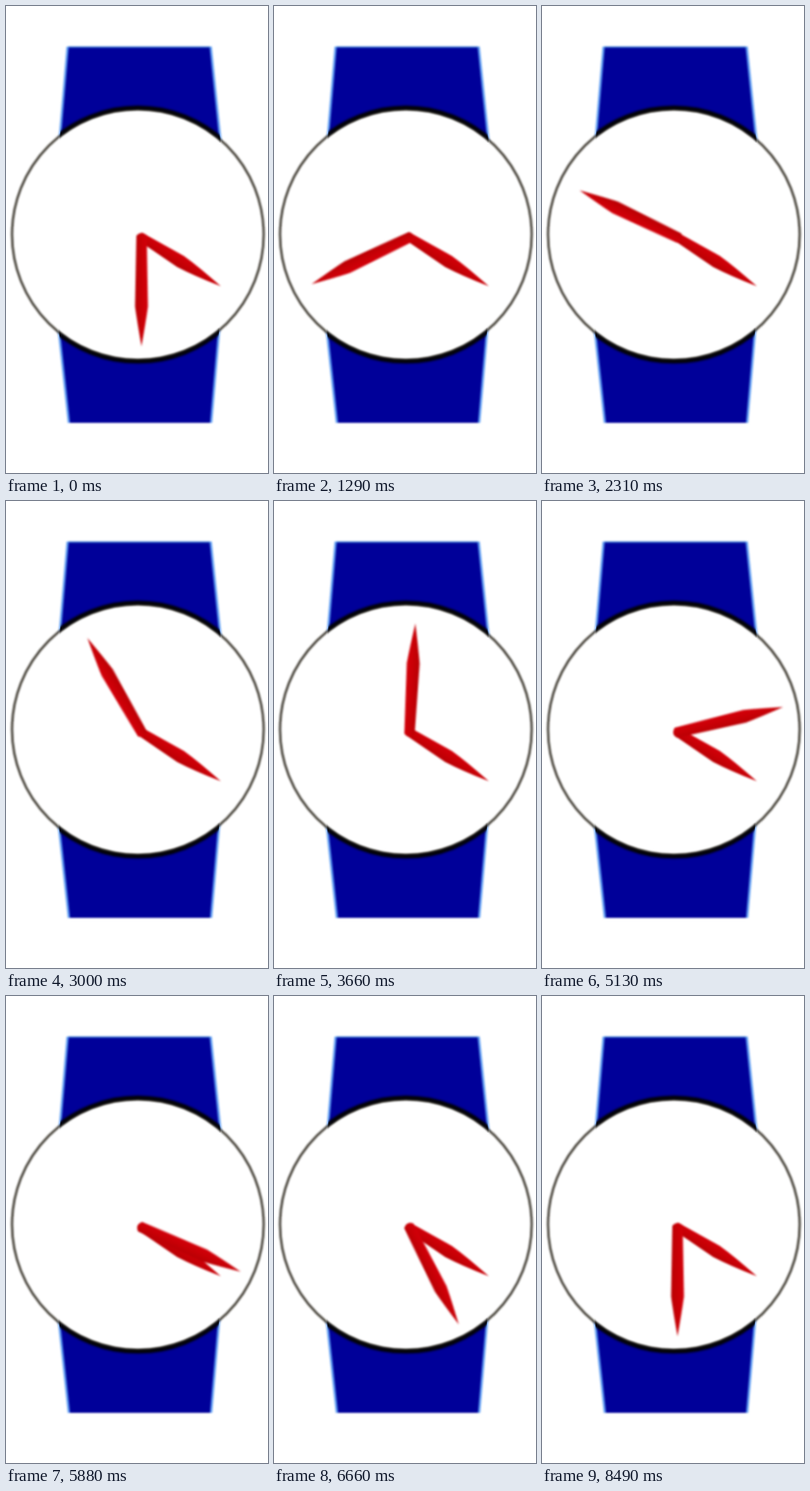
An HTML page for the animation above (8.52 s loop, 304 px wide and 540 px high).

```html
<!DOCTYPE html>
<html lang="en">
<head>
<meta charset="utf-8">
<title>Wristwatch</title>
<style>
  html, body { margin: 0; width: 100%; height: 100%; overflow: hidden; background: #fff; }
  svg { display: block; width: 100vw; height: 100vh; }
  .strap { fill: #000099; }
  .edge { fill: none; stroke: #5c9cf2; stroke-width: 2.6; }
  .rim { fill: none; stroke: #2f6fd0; stroke-width: 1.6; }
  .minute { animation: sweep 8520ms linear infinite; }
  /* One full turn in 7200 ms, then rest until the loop ends */
  @keyframes sweep {
    0% { transform: translate(157.3px, 267.5px) rotate(180deg); }
    84.507%, 100% { transform: translate(157.3px, 267.5px) rotate(540deg); }
  }
</style>
</head>
<body>
<svg viewBox="0 0 304 540">
  <defs>
    <filter id="soft" x="-10%" y="-10%" width="120%" height="120%" color-interpolation-filters="sRGB">
      <feGaussianBlur stdDeviation="1.1"/>
    </filter>
    <filter id="shade" x="-10%" y="-10%" width="120%" height="120%" color-interpolation-filters="sRGB">
      <feGaussianBlur stdDeviation="1.8"/>
    </filter>
    <linearGradient id="red">
      <stop offset="0" stop-color="#d4000a"/>
      <stop offset=".5" stop-color="#c80006"/>
      <stop offset="1" stop-color="#b80004"/>
    </linearGradient>
    <path id="top" d="M71.5 47H237.5L249 158H62Z"/>
    <path id="bottom" d="M61 372H247.5L238 482H73Z"/>
    <clipPath id="band">
      <use href="#top"/>
      <use href="#bottom"/>
    </clipPath>
  </defs>

  <g filter="url(#soft)">
    <use href="#top" class="strap"/>
    <use href="#bottom" class="strap"/>
    <path class="rim" d="M72 47.5H237"/>
    <path class="edge" d="M71.5 47L62 158M237.5 47L249 158M61 372L73 482M247.5 372L238 482"/>
  </g>

  <ellipse cx="153" cy="264.3" rx="146" ry="145.3" fill="#fff" stroke="#4c483f" stroke-width="2.8" filter="url(#soft)"/>
  <g clip-path="url(#band)">
    <ellipse cx="153" cy="264.3" rx="147.5" ry="146.8" fill="none" stroke="#000" stroke-width="4.5" filter="url(#shade)"/>
  </g>

  <g fill="url(#red)" filter="url(#soft)">
    <path transform="translate(157.3 267.5) rotate(121.6)"
      d="M-5 2Q0 8 5 2L7.5 -53Q6 -74 0 -108Q-6 -74 -7.5 -53Z"/>
    <g class="minute">
      <path d="M-6 2Q0 8 6 2L7.5 -80Q5 -98 0 -126Q-5 -98 -7.5 -80Z"/>
    </g>
  </g>
</svg>
</body>
</html>
```
